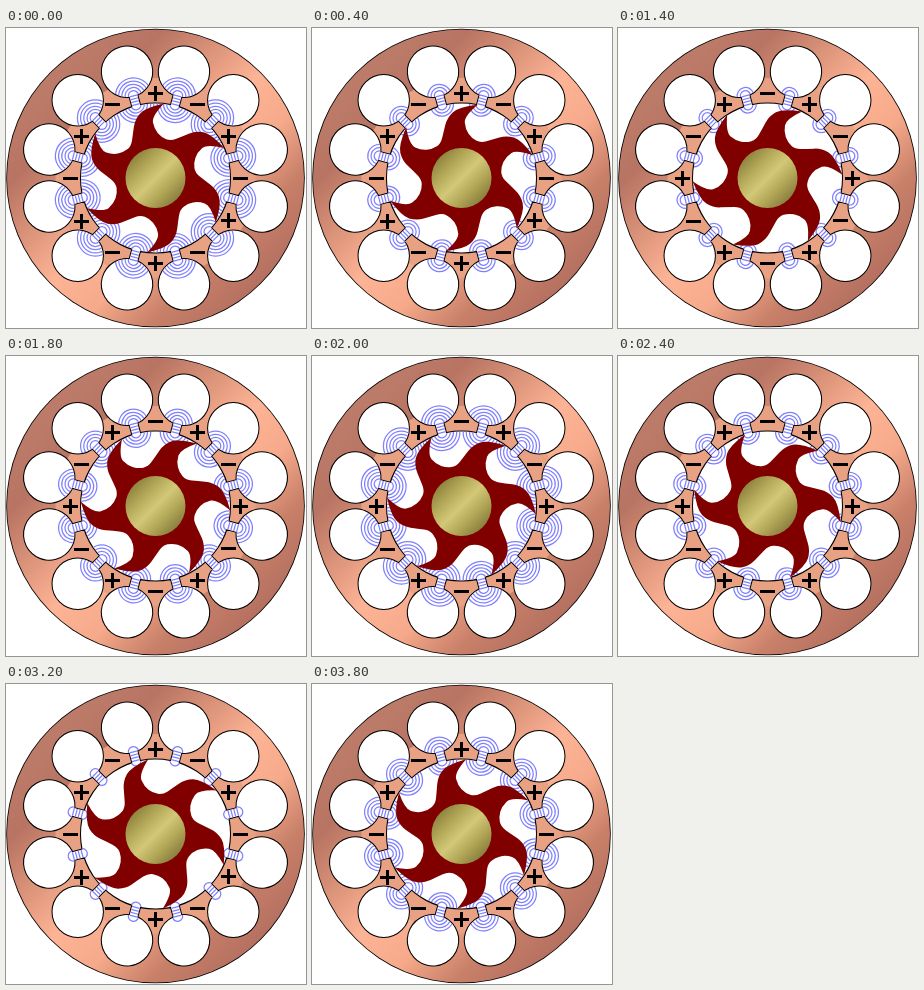
An HTML page with a canvas that plays this animation: 300 by 300 pixels, repeating every 4000 ms.

```html
<!DOCTYPE html>
<html>
<head>
<meta charset="utf-8">
<style>
html, body { margin: 0; width: 100%; height: 100%; overflow: hidden; background: #fff; }
canvas { display: block; }
</style>
</head>
<body>
<canvas id="stage" width="300" height="300"></canvas>
<script>
const ctx = document.getElementById('stage').getContext('2d');
const RAD = Math.PI / 180, FULL = 2 * Math.PI;
const LOOP = 4000, STEP = 200;
const CX = 149.5, CY = 150;
const INNER = 76, OUTER = 85;          // ends of each slot, measured from the centre
const slots = Array.from({length: 12}, (_, i) => 15 + 30 * i);

// Angles run clockwise from the top
const polar = (r, deg) => [r * Math.sin(deg * RAD), -r * Math.cos(deg * RAD)];

function gradient(x0, y0, x1, y1, colors) {
  const g = ctx.createLinearGradient(x0, y0, x1, y1);
  colors.forEach((c, i) => g.addColorStop(i / (colors.length - 1), c));
  return g;
}

const copper = gradient(-105, -105, 105, 105,
  ['#bd7c69', '#b87463', '#dc947a', '#fdb395', '#f6aa8b', '#c88069', '#b57060']);
const gold = gradient(-21, -21, 21, 21, ['#91863f', '#b5a95a', '#d3c878', '#b3a758', '#8c8140']);

// Cavity, slots and round resonators as one outline
const hollow = new Path2D();
hollow.arc(0, 0, 74.5, 0, FULL);
for (const a of slots) {
  const part = new Path2D();
  part.arc(0, -110, 25.2, 0, FULL);
  part.rect(-4, -88, 8, 16);
  hollow.addPath(part, new DOMMatrix().rotate(a));
}

// One arm of the cloud: radius and angle, starting at the tip
const arm = [[62, -10], [49, -8], [41, 2], [40, 16], [49, 26], [62, 34], [71, 45]];
const cloud = new Path2D();
cloud.moveTo(...polar(75, 0));
for (let turn = 0; turn < 360; turn += 60) {
  const pts = arm.map(([r, a]) => polar(r, a + turn));
  for (let i = 0; i < pts.length - 1; i++) {
    const [x, y] = pts[i], [u, v] = pts[i + 1];
    cloud.quadraticCurveTo(x, y, (x + u) / 2, (y + v) / 2);
  }
  cloud.quadraticCurveTo(...pts.at(-1), ...polar(75, turn + 60));
}
cloud.closePath();

function disc(r, fill) {
  ctx.beginPath();
  ctx.arc(0, 0, r, 0, FULL);
  ctx.fillStyle = fill;
  ctx.fill();
}

function drawField(level) {
  ctx.save();
  ctx.clip(hollow);
  ctx.strokeStyle = '#8080ff';
  ctx.lineWidth = 1.25;
  for (const a of slots) {
    ctx.save();
    ctx.rotate(a * RAD);
    ctx.beginPath();
    for (let n = 1; n <= level; n++) {
      const r = 2 + 3.2 * n;
      ctx.moveTo(-r, -OUTER);
      ctx.arc(0, -OUTER, r, Math.PI, FULL);
      ctx.moveTo(r, -INNER);
      ctx.arc(0, -INNER, r, 0, Math.PI);
    }
    if (level) {
      for (let y = -OUTER; y <= -INNER; y += 3) {
        ctx.moveTo(-4, y);
        ctx.lineTo(4, y);
      }
    }
    ctx.stroke();
    ctx.restore();
  }
  ctx.restore();
}

function drawSigns(plusOnTop) {
  ctx.fillStyle = '#000';
  for (let i = 0; i < 12; i++) {
    const [dx, dy] = polar(85, 30 * i);
    const x = Math.round(CX + dx) - CX, y = Math.round(CY + dy) - CY;
    ctx.fillRect(x - 8, y - 1, 15, 3);
    if ((i % 2 === 0) === plusOnTop) ctx.fillRect(x - 2, y - 7, 3, 15);
  }
}

function draw(now) {
  const k = Math.floor(now % LOOP / STEP);
  const level = Math.abs(5 - k % 10);
  ctx.setTransform(1, 0, 0, 1, 0, 0);
  ctx.fillStyle = '#fff';
  ctx.fillRect(0, 0, 300, 300);
  ctx.translate(CX, CY);

  disc(149.3, '#000');
  disc(148.5, copper);
  disc(100, '#e8a182');
  ctx.lineWidth = 2;
  ctx.stroke(hollow);
  ctx.fillStyle = '#fff';
  ctx.fill(hollow);
  drawField(level);
  drawSigns(k < 5 || k > 15);

  ctx.save();
  ctx.rotate((6.5 + 3 * k) * RAD);
  ctx.fillStyle = '#800000';
  ctx.fill(cloud);
  ctx.restore();
  disc(30, gold);
  requestAnimationFrame(draw);
}
requestAnimationFrame(draw);
</script>
</body>
</html>
```
